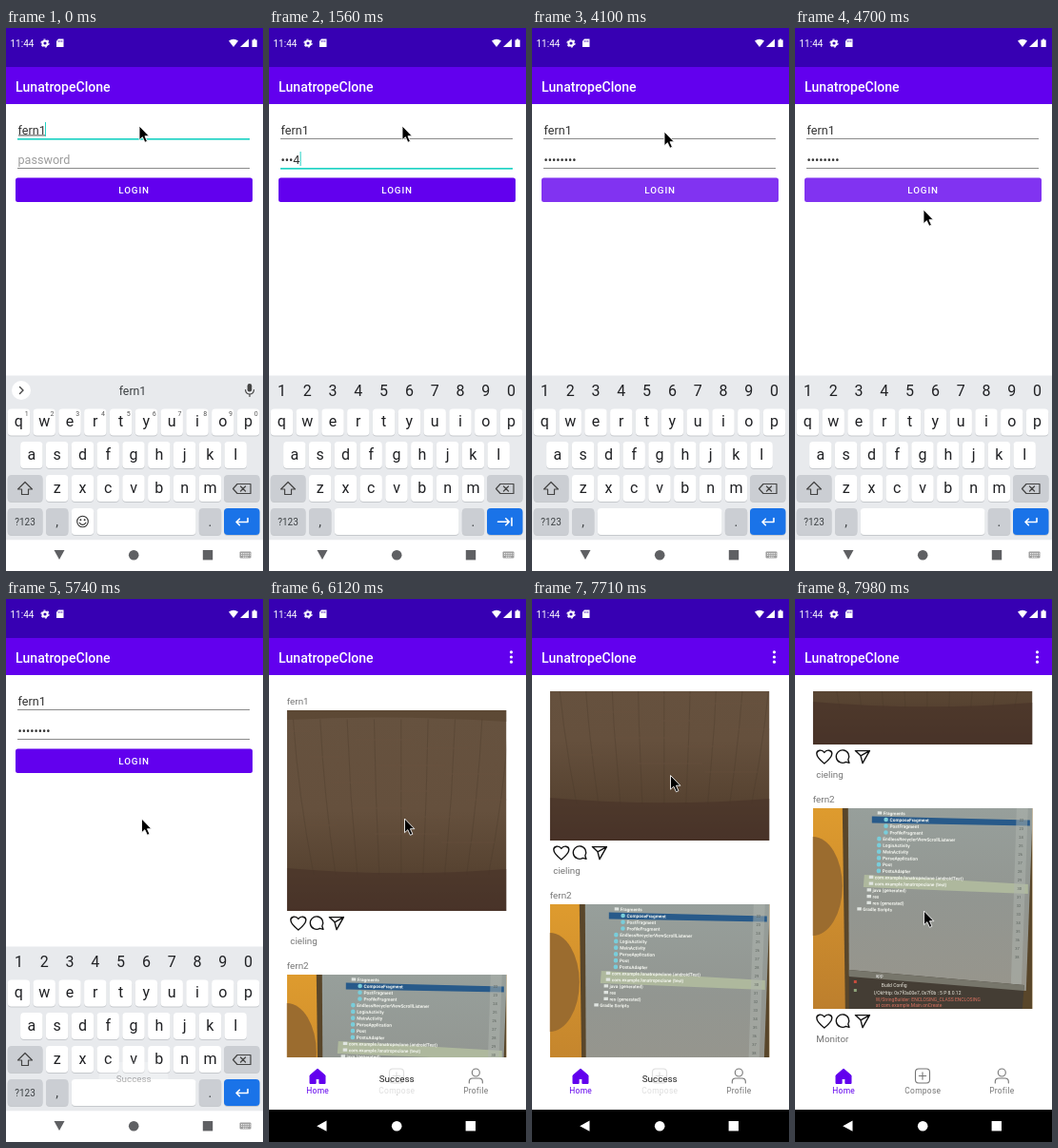
An HTML page for the animation above (8 s loop, 270x571 px).

```html
<!DOCTYPE html>
<html lang="en">
<head>
<meta charset="utf-8">
<title>Login and feed</title>
<style>
html, body { margin: 0; width: 100%; height: 100%; overflow: hidden; background: #fff; }
svg { display: block; width: 100vw; height: 100vh; }
text { font-family: Roboto, "Noto Sans", sans-serif; white-space: pre; }
.line { fill: none; stroke-linejoin: round; stroke-linecap: round; }
</style>
</head>
<body>
<svg id="stage" viewBox="0 0 270 571"></svg>
<script>
const LOOP = 8000;
const PURPLE = '#6200ee', TEAL = '#22d3c5', INK = '#202124', GREY = '#757575';
const APP = 'LunatropeClone', USERS = ['fern1', 'fern2'];

const rect = (x, y, w, h, fill, r = 0, extra = '') =>
  `<rect x="${x}" y="${y}" width="${w}" height="${h}" rx="${r}" fill="${fill}" ${extra}/>`;
const text = (x, y, s, size, fill, extra = '') =>
  `<text x="${x}" y="${y}" font-size="${size}" fill="${fill}" ${extra}>${s}</text>`;
const mid = (x, y, s, size, fill, extra = '') => text(x, y, s, size, fill, `text-anchor="middle" ${extra}`);
const path = (d, fill, extra = '') => `<path d="${d}" fill="${fill}" ${extra}/>`;
const line = (d, color = '#111', width = 1.4) =>
  `<path class="line" d="${d}" stroke="${color}" stroke-width="${width}"/>`;
const circle = (x, y, r, fill, extra = '') => `<circle cx="${x}" cy="${y}" r="${r}" fill="${fill}" ${extra}/>`;
const group = (id, body) => `<g id="${id}">${body}</g>`;

function statusBar() {
  return rect(0, 0, 270, 41, '#3700b3') + rect(0, 41, 270, 39, PURPLE)
    + text(4.5, 20, '11:44', 10, '#fff')
    + circle(41, 16, 2.6, 'none', 'stroke="#fff" stroke-width="2"')
    + circle(41, 16, 4, 'none', 'stroke="#fff" stroke-width="1.2" stroke-dasharray="2 2.19"')
    + path('M55 11.5H60.5V20H53V13.7Z', '#fff')
    + path('M55.2 13v1.8M57 13v1.8M58.8 13v1.8', 'none', 'stroke="#3700b3" stroke-width=".7"')
    + path('M234 13.5Q239 9.8 244 13.5L239 20Z', '#fff')
    + path('M246 20L255 11.5V20Z', '#fff')
    + path('M258.5 12.5h1.6v-1h2v1h1.6v7.5h-5.2Z', '#fff')
    + text(10, 66.5, APP, 14.06, '#fff', 'font-weight="500"');
}

function loginForm() {
  return rect(0, 80, 270, 458, '#fff')
    + text(12.5, 111.5, USERS[0], 12.6, '#333')
    + group('composing', rect(13, 112.5, 28, .9, '#333'))
    + rect(12, 116, 244, 1, '#888', 0, 'id="userLine"')
    + text(12.5, 142.5, '', 12.6, '#9c9c9c', 'id="password"')
    + rect(12, 147, 244, 1, '#888', 0, 'id="passLine"')
    + rect(41, 99, 1, 15, TEAL, 0, 'id="caret"')
    + rect(10, 157.5, 249, 25.5, PURPLE, 2.5, 'id="login"')
    + mid(134.6, 174, 'LOGIN', 9.84, '#fff', 'font-weight="500" letter-spacing=".88"');
}

const PITCH = 26.8;
const key = (x, y, w, fill = '#fff') => rect(x, y + 1, w, 28, '#c6c9cd', 4) + rect(x, y, w, 28, fill, 4);
const letterRow = (letters, first, y) => [...letters].map((c, i) => {
  const x = first + i * PITCH;
  return key(x - 11.7, y, 23.4) + mid(x, y + 18.7, c, 16, INK);
}).join('');
const numberRow = (dx, y, size, fill) =>
  [...'1234567890'].map((n, i) => mid(13.4 + i * PITCH + dx, y, n, size, fill)).join('');

function keyboard() {
  const dark = '#cbced3';
  const wordStrip = circle(16, 381, 10, '#fff') + line('M14.5 377.5l3.5 3.5l-3.5 3.5', '#444')
    + mid(133, 385.5, USERS[0], 12.3, '#3c4043')
    + rect(253.6, 374, 4.6, 8.5, '#444', 2.3) + line('M251.5 380.5Q252 385 256 385T260.5 380.5M256 385V387.5', '#444', 1.2)
    + numberRow(8.2, 407.5, 7, '#555')
    + key(68.8, 505, 23.4) + key(95.5, 505, 104)
    + circle(80.5, 519, 5.8, 'none', 'stroke="#333" stroke-width="1.1"')
    + circle(78.4, 517.3, 1, '#333') + circle(82.6, 517.3, 1, '#333') + line('M77.2 520.3Q80.5 524.5 83.8 520.3', '#333', 1.1);
  const numberStrip = numberRow(0, 387, 16, INK) + key(68.8, 505, 130.7);
  return rect(0, 365.5, 270, 173, '#e8eaed')
    + letterRow('qwertyuiop', 13.4, 400.5) + letterRow('asdfghjkl', 26.8, 435) + letterRow('zxcvbnm', 53.6, 470)
    + key(1.7, 470, 36.8, dark) + line('M20 477.5L12.5 485H16.5V490.5H23.5V485H27.5Z', '#444', 1.2)
    + key(229, 470, 37.5, dark) + line('M243 479.5H257V489.5H243L238.5 484.5ZM246.5 482l5 5M251.5 482l-5 5', '#444', 1.2)
    + key(1.7, 505, 36.8, dark) + mid(20, 522.5, '?123', 10, '#3c4043')
    + key(42, 505, 23.4, dark) + mid(53.7, 524, ',', 14, '#3c4043')
    + key(202.8, 505, 23.4, dark) + mid(214.4, 524, '.', 14, '#3c4043')
    + key(229, 505, 37.5, '#1a73e8')
    + group('wordStrip', wordStrip) + group('numberStrip', numberStrip)
    + group('enterArrow', line('M254 515.5V519.5H242M245.3 516.2L242 519.5L245.3 522.8', '#fff', 1.6))
    + group('tabArrow', line('M240.5 519.3H252M248.8 515.8L252.3 519.3L248.8 522.8M255 515.3V523.3', '#fff', 1.6))
    + rect(0, 538.5, 270, 33, '#fff')
    + path('M50.5 549H61.5L56 559Z', '#5f6063') + circle(134.2, 554.2, 5.3, '#5f6063') + rect(206.8, 549, 10.4, 10.4, '#5f6063')
    + rect(245.5, 550.5, 12, 7, '#a0a0a0', 1)
    + path('M247 552.5H256.5M247 554.3H256.5M249 556.2H254.5', 'none', 'stroke="#fff" stroke-width=".9" stroke-dasharray="1 .8"');
}

// Photos are drawn in a 230.5 x 211 box.
function ceiling() {
  const seams = Array.from({length: 9}, (_, i) => {
    const x = 12 + i * 27, lean = (i - 4) * -4;
    return line(`M${x - lean / 3} 10Q${x} 90 ${x + lean} 172`, '#4b3b2d', .8);
  }).join('');
  const grain = Array.from({length: 14}, (_, i) =>
    line(`M${(i * 71) % 190} ${22 + i * 9}h${24 + (i * 37) % 50}`, '#6d5845', .7)).join('');
  return rect(0, 0, 231, 211, 'url(#brown)') + path('M0 0H231V12Q110 4 0 10Z', '#58432f', 'opacity=".6"')
    + `<g opacity=".45">${seams}${grain}</g>`
    + path('M0 166Q115 176 231 167V211H0Z', '#493428', 'opacity=".65"');
}

function monitor() {
  const rows = ['Fragments', 'ComposeFragment', 'PostFragment', 'ProfileFragment', 'EndlessRecyclerViewScrollListener',
    'LoginActivity', 'MainActivity', 'ParseApplication', 'Post', 'PostsAdapter', 'com.example.lunatropeclone (androidTest)',
    'com.example.lunatropeclone (test)', 'java (generated)', 'res', 'res (generated)', 'Gradle Scripts'];
  const tree = rows.map((s, i) => {
    const x = i === 0 ? 74 : i < 4 ? 81 : i < 10 ? 74 : i < 12 ? 66 : i < 15 ? 64 : 54;
    const y = 6 + i * 6.75;
    const icon = i > 0 && i < 10 ? circle(x - 4, y - 1.8, 2.3, '#79cdda') : rect(x - 6, y - 3.6, 4.5, 3.2, '#dfe4e0');
    return icon + text(x, y, s, 4.8, '#f3f5ef', 'font-weight="700"');
  }).join('');
  const numbers = Array.from({length: 17}, (_, i) => text(217 - i * .3, 14 + i * 9, 22 + i, 4, '#59605b')).join('');
  const log = text(66, 178, 'app', 4.6, '#eee') + text(72, 188, 'Build Config', 5, '#e8e6dc')
    + text(64, 195.5, 'I/OkHttp: 0x7f0a00e7, 0x7f0b : 5 P 8.0.12', 5, '#e8e6dc')
    + text(66, 202.5, 'W/StringBuilder: ENCLOSING_CLASS ENCLOSING', 5, '#d8705f')
    + text(66, 209, 'at com.example.Main.onCreate', 5, '#d8705f');
  return rect(0, 0, 231, 211, 'url(#amber)')
    + '<ellipse cx="0" cy="82" rx="31" ry="52" fill="#9b6c2f"/>'
    + path('M31 0H231V211H34Z', '#59462a')
    + path('M37 0H231L224 192L38 176Z', 'url(#screen)')
    + path('M62 8.5L228 12.5V18.5L62 15.5Z', '#285a8a') + path('M54 70L226 80V90L53 83Z', '#b7c3a0', 'opacity=".75"')
    + `<g transform="rotate(.8)">${tree}</g>` + path('M214 0H226L219 188L208 187Z', '#b0b6af', 'opacity=".5"') + numbers
    + path('M38 170L222 186L220 211H38Z', '#443d34') + path('M38 170L222 186V192L38 177Z', '#77766b') + log
    + rect(43, 181, 3, 3, '#c94c3d') + rect(43, 190, 3, 3, '#8fa57c');
}

function post(y, user, caption, photo) {
  const icons = line('M8 0C3-4 0-7 0-10.5C0-14 5.5-15.5 8-11.5C10.5-15.5 16-14 16-10.5C16-7 13 -4 8 0Z')
    + line('M30.6-1.6A6.7 6.7 0 1 1 33-4L34.2-.6Z')
    + line('M40.6-13.4H55.6L48.2-.3L46.2-8.2ZM46.2-8.2L55.6-13.4');
  return `<g transform="translate(18.8 ${y})">${text(0, -6, user, 9.84, GREY)}
    <svg width="230.5" height="211" overflow="hidden">${photo}</svg>
    <g transform="translate(4 231)">${icons}</g>${text(3.5, 246, caption, 9.84, GREY)}</g>`;
}

function feed() {
  const tab = (x, s, color) => mid(x, 519.7, s, 8.44, color, 'letter-spacing=".28"');
  return rect(0, 80, 270, 458, '#fff')
    + [55.8, 61, 66.2].map(y => circle(254.5, y, 1.6, '#fff')).join('')
    + `<g clip-path="url(#list)">${group('posts', post(117, USERS[0], 'cieling', ceiling()) + post(395, USERS[1], 'Monitor', monitor()))}</g>`
    + path('M51 494L59 501V509.5H52.9V504.5H49.1V509.5H43V501Z', PURPLE, `stroke="${PURPLE}" stroke-linejoin="round"`)
    + tab(51.2, 'Home', PURPLE)
    + rect(126.5, 494, 15, 15, 'none', 3.5, `stroke="${GREY}" stroke-width="1.1"`) + line('M134 497.8V505.2M130.3 501.5H137.7', GREY, 1.1)
    + tab(134.3, 'Compose', GREY)
    + circle(217.3, 498, 4, 'none', `stroke="${GREY}" stroke-width="1.1"`) + line('M210.3 509V507.5Q210.3 504 214 504H220.6Q224.3 504 224.3 507.5V509', GREY, 1.1)
    + tab(217.3, 'Profile', GREY)
    + rect(0, 537, 270, 34, '#000')
    + path('M60.5 548.5V559.8L50.2 554.2Z', '#fff') + circle(134.2, 554.3, 5.3, '#fff') + rect(206.6, 549, 10.4, 10.4, '#fff');
}

const gradient = (id, ...stops) => `<linearGradient id="${id}" x2="0" y2="1">${stops.map(([at, color]) =>
  `<stop offset="${at}" stop-color="${color}"/>`).join('')}</linearGradient>`;

document.getElementById('stage').innerHTML = `<defs>
  ${gradient('brown', [0, '#66523f'], [.5, '#65503d'], [.78, '#584432'], [1, '#493429'])}
  ${gradient('amber', [0, '#de9b2e'], [1, '#bd7f2d'])}
  ${gradient('screen', [0, '#979f9b'], [.5, '#929691'], [1, '#97958c'])}
  <clipPath id="list"><rect y="97" width="270" height="385"/></clipPath></defs>`
  + rect(0, 0, 270, 571, '#fff') + statusBar() + loginForm() + keyboard() + group('feed', feed())
  + group('toast', rect(97.5, 487, 73, 34.5, '#fff', 17, 'fill-opacity=".76"') + mid(134.2, 508, 'Success', 9.84, '#222'))
  + group('pointer', path('M0 0V13.6L3.1 10.8L5.5 16L7.8 15L5.5 9.9H9.6Z', '#000', 'stroke="#fff" stroke-width=".8"'));

const el = id => document.getElementById(id);
const show = (id, on) => el(id).setAttribute('visibility', on ? 'visible' : 'hidden');
const set = (id, attrs) => Object.entries(attrs).forEach(([k, v]) => el(id).setAttribute(k, v));
const hold = (steps, t) => steps.reduce((value, [at, v]) => t >= at ? v : value, null);

const KEY_TIMES = [880, 1030, 1280, 1560, 1840, 2090, 2340, 2630];
const POINTER = [[0, [140, 103]], [4100, [139, 109]], [4220, [138, 127]], [4340, [137, 148]], [4460, [136, 163]],
  [4580, [136, 172]], [4700, [135, 191]], [4820, [126, 207]], [5100, [133, 221]], [5220, [142.5, 231]],
  [6490, [237, 295]], [6640, [190, 203]], [6760, null], [7290, [134, 281]], [7440, [140, 282]],
  [7560, [146, 283]], [7710, [145.5, 185.5]], [7830, [141, 187]], [7980, [135.5, 328]]];
const SCROLL = [[0, 0], [7710, 74], [7830, 142], [7980, 175]];
const TOAST = [[0, 0], [5740, .35], [5880, .75], [6000, 1], [7830, .5], [7980, 0]];
const FEED = [[0, 0], [5880, .5], [6000, 1]];

function underline(id, y, focused) {
  set(id, {y, height: focused ? 1.7 : 1, fill: focused ? TEAL : '#8a8a8a'});
}

function render(t) {
  const typed = KEY_TIMES.filter(at => t >= at).length;
  const masked = t >= 3250;
  const focus = t < 390 ? 'user' : masked ? '' : 'password';

  show('composing', focus === 'user');
  underline('userLine', 116, focus === 'user');
  underline('passLine', 147, focus === 'password');
  el('password').textContent = !typed ? 'password' : masked ? '•'.repeat(8) : '•'.repeat(typed - 1) + typed;
  set('password', {fill: typed ? '#333' : '#9c9c9c'});
  show('caret', t < 3130);
  set('caret', focus === 'user' ? {x: 41, y: 99} : {x: typed ? 15.6 + typed * 4.25 : 12.3, y: 130});
  set('login', {fill: t >= 3400 && t < 4820 ? '#8133f1' : PURPLE});

  const numeric = t >= 510;
  show('wordStrip', !numeric);
  show('numberStrip', numeric);
  show('tabArrow', numeric && t < 3400);
  show('enterArrow', !numeric || t >= 3400);

  set('feed', {opacity: hold(FEED, t)});
  show('posts', t >= 6120);
  set('posts', {transform: `translate(0 ${-hold(SCROLL, t)})`});
  set('toast', {opacity: hold(TOAST, t)});

  const tip = hold(POINTER, t);
  show('pointer', tip);
  if (tip) set('pointer', {transform: `translate(${tip}) scale(1.08)`});
}

function tick() {
  render(performance.now() % LOOP);
  requestAnimationFrame(tick);
}
tick();
</script>
</body>
</html>
```
